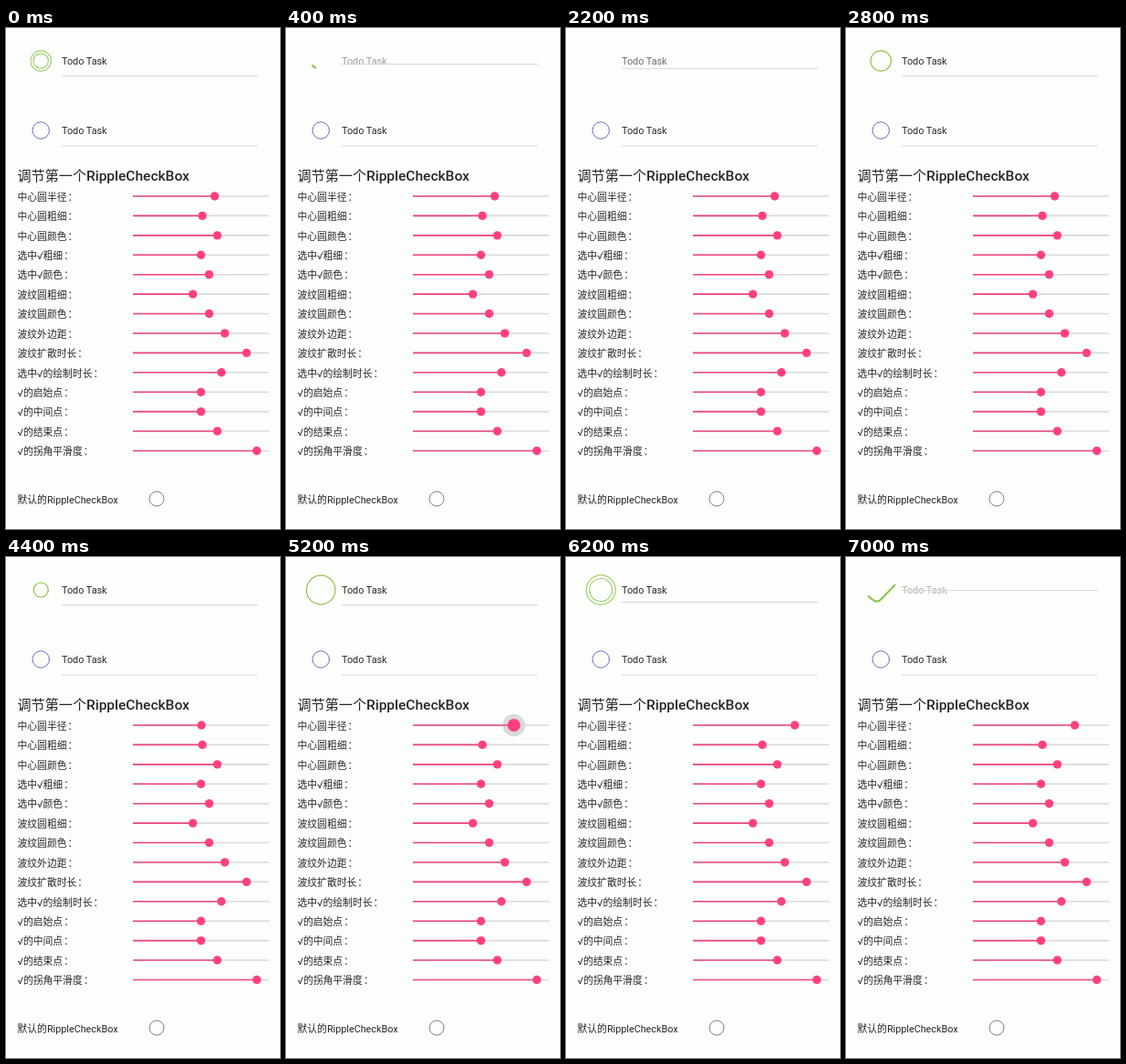
Animation of 300 by 548 pixels, one loop 8 s. Source, as an HTML page:

```html
<!DOCTYPE html>
<html lang="zh-CN">
<head>
<meta charset="utf-8">
<style>
  html, body { margin: 0; width: 100%; height: 100%; overflow: hidden; background: #fcfefc; }
  svg { display: block; width: 300px; height: 548px; }
  text { font: 10.8px Roboto, "Noto Sans CJK SC", "Noto Sans CJK", sans-serif; fill: #262626; }
  .title { font-size: 15.1px; }
  .title tspan { font-size: 15.5px; font-weight: 500; }
  .rule { stroke: #d9dad9; stroke-width: 1.2; }
  .track { stroke: #d9dad9; stroke-width: 1.6; }
  .fill { stroke: #ee467f; stroke-width: 1.6; }
  .knob { fill: #ff4081; }
  .ring { fill: none; stroke: #8bc34a; stroke-width: 1.2; }
  #check { stroke-width: 2.1; stroke-linejoin: round; }
</style>
</head>
<body>
<svg viewBox="0 0 300 548">
  <text id="task" x="61" y="40">Todo Task</text>
  <line id="taskRule" class="rule" x1="61" x2="276"/>
  <g id="box" class="ring" transform="translate(38.2 36)">
    <circle id="base"/>
    <circle id="wave"/>
    <path id="check" pathLength="1"/>
  </g>

  <circle cx="38.2" cy="112" r="9.2" fill="none" stroke="#5361b0" stroke-width=".9"/>
  <text x="61" y="116">Todo Task</text>
  <line class="rule" x1="61" x2="276" y1="129" y2="129"/>

  <text class="title" x="12.5" y="167">调节第一个<tspan>RippleCheckBox</tspan></text>
  <circle id="halo" cy="184" fill="#d9dad9"/>
  <g id="sliders"></g>

  <text x="12.5" y="519.5">默认的RippleCheckBox</text>
  <circle cx="165" cy="515" r="8" fill="none" stroke="#808080"/>
</svg>
<script>
const LOOP = 8000, TICK = 200;
const UNCHECK = 2000, RECHECK = 6100;

// Slider settings in percent.
const settings = {
  中心圆半径: 60, 中心圆粗细: 51, 中心圆颜色: 62, '选中√粗细': 50, '选中√颜色': 56,
  波纹圆粗细: 44, 波纹圆颜色: 56, 波纹外边距: 67.5, 波纹扩散时长: 83.5,
  '选中√的绘制时长': 65, '√的启始点': 50, '√的中间点': 50, '√的结束点': 62, '√的拐角平滑度': 91
};

const $ = id => document.getElementById(id);
const set = (el, attrs) => { for (const k in attrs) el.setAttribute(k, attrs[k]); };
const ramp = (t, from, duration) => Math.min(1, Math.max(0, (t - from) / duration));
const easeOut = p => Math.sin(p * Math.PI / 2);

$('sliders').innerHTML = Object.entries(settings).map(([label, percent], i) => {
  const x = 139 + 1.49 * percent, y = 184 + 21.42 * i;
  return `<text x="12.5" y="${y + 4.8}">${label}<tspan dx="1">：</tspan></text>
    <line class="track" x1="139" x2="288" y1="${y}" y2="${y}"/>
    <line class="fill" x1="139" x2="${x}" y1="${y}" y2="${y}"/>
    <circle class="knob" cx="${x}" cy="${y}" r="4.7"/>`;
}).join('');
const fill = document.querySelector('.fill'), knob = document.querySelector('.knob');

function drawSlider(t) {
  const x = 228.5 - 20.5 * easeOut(ramp(t, 4200, 400))
    + 48 * easeOut(ramp(t, 4800, 600)) - 5.5 * easeOut(ramp(t, 5400, 400));
  const press = ramp(t, 4400, 200) - ramp(t, 5600, 400);
  set(fill, { x2: x });
  set(knob, { cx: x, r: 4.7 + 2.3 * press });
  set($('halo'), { cx: x, r: press && 4.7 + 7.6 * press });
  return 11.2 + (x - 228.5) * .22;
}

function drawTask(shift, dim) {
  const y = 52.5 - 16 * shift, gray = 38 + 140 * dim;
  set($('taskRule'), { y1: y, y2: y });
  $('task').style.fill = `rgb(${gray},${gray},${gray})`;
}

function drawBox(r, base, wave, drawn, opacity) {
  const p = (x, y) => `${x * r} ${y * r}`;
  set($('box'), { opacity });
  set($('base'), { r: r * base });
  set($('wave'), { r: r * wave });
  set($('check'), {
    d: `M${p(-.88, .4)}L${p(-.62, .63)}Q${p(-.28, .95)} ${p(.03, .62)}L${p(.98, -.36)}`,
    'stroke-dasharray': `${drawn} 2`,
    visibility: drawn ? 'visible' : 'hidden'
  });
}

function draw(t) {
  const r = drawSlider(t);
  if (t < UNCHECK || t >= RECHECK) {
    // The inner wave gives way to the tick while the rule strikes the text.
    const s = t < UNCHECK ? t : t - RECHECK, rippling = s < 200;
    drawTask(ramp(s, 0, 500), ramp(s, 150, 300));
    drawBox(r, rippling ? 1 : 0, rippling ? .73 + s / 2000 : 0, ramp(s, 300, 500), rippling ? .8 : 1);
  } else {
    // The ring grows back and a wave runs outwards.
    const s = t - UNCHECK, back = 1 - ramp(s, 0, 400), spread = ramp(s, 400, 400);
    drawTask(back, back);
    drawBox(r, ramp(s, 200, 400), spread < 1 ? 5 * spread : 0, s < 200 ? 1 : 0, 1);
  }
}

const start = performance.now();
function frame() {
  const t = (performance.now() - start) % LOOP;
  draw(Math.floor(t / TICK) * TICK);
  requestAnimationFrame(frame);
}
frame();
</script>
</body>
</html>
```
